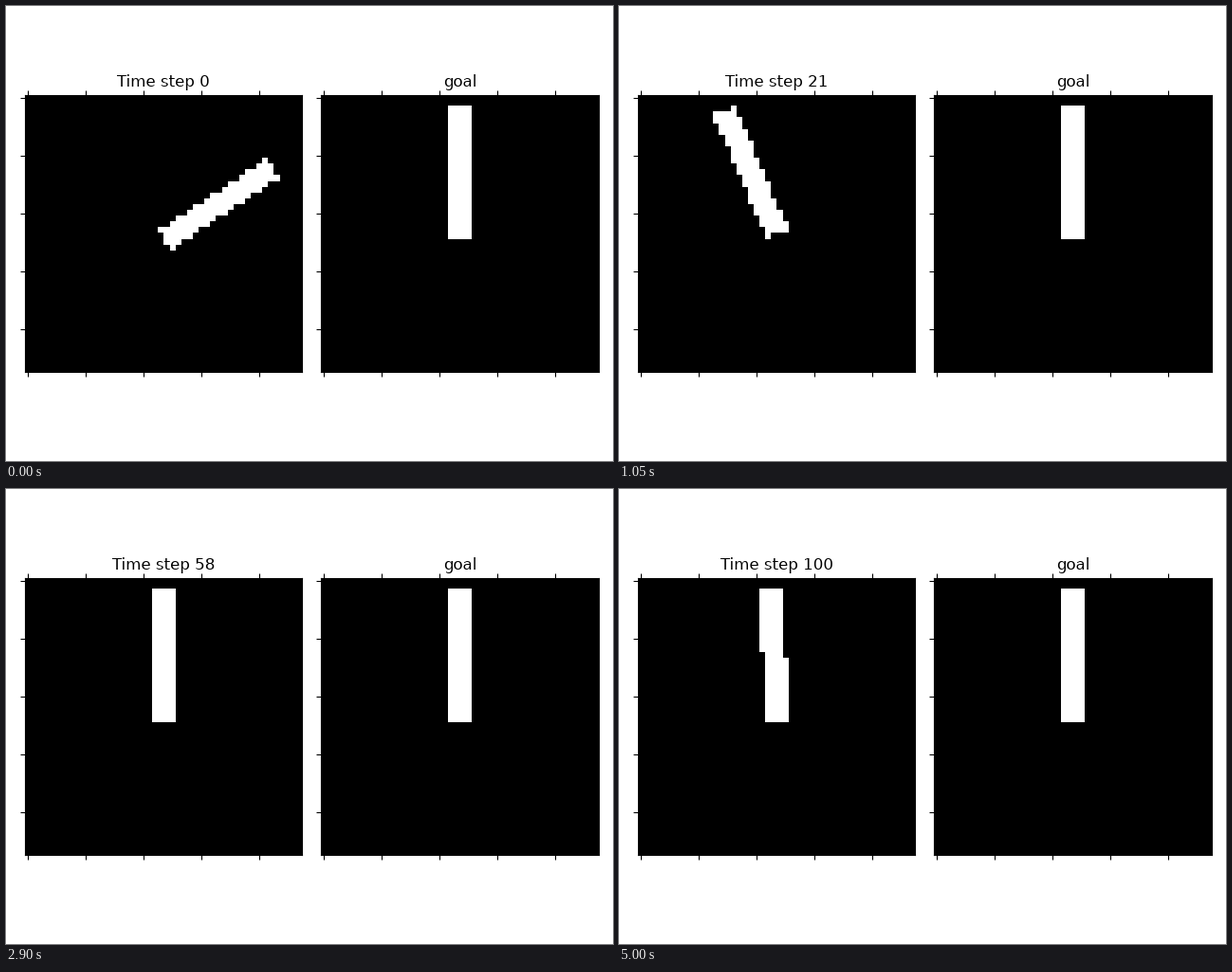
These frames come from a looping animation (640x480 px, 5050 ms). A matplotlib script:

```python
import math
import numpy as np
import matplotlib.pyplot as plt
from matplotlib.animation import FuncAnimation

plt.rcParams["text.hinting"] = "native"

SIZE = 48        # cells per side
PIVOT = 24
LENGTH = 22
STEPS = 101


def angle(step):
    """Lean from upright in radians: swing up, overshoot, then hover."""
    if step <= 13:
        return math.radians(58.5 - 0.1046 * step ** 2.4)
    s = step - 14.1
    decay = math.exp(-0.075 * s)
    swing = -35.5 * math.sin(0.245 * s)
    hover = -0.88 + 1.9 * math.cos(2 * math.pi * (step - 57) / 15.5)
    return math.radians(decay * swing + (1 - decay) * hover)


def half_up(v):
    return int(math.copysign(math.floor(abs(v) + 0.5), v))


def half_down(v):
    return int(math.copysign(math.ceil(abs(v) - 0.5), v))


def pole_corners(theta):
    """Whole-cell corners of a line four cells wide."""
    x0 = y0 = PIVOT
    x1 = math.floor(PIVOT + LENGTH * math.sin(theta))
    y1 = math.floor(PIVOT - LENGTH * math.cos(theta))
    dx, dy = x1 - x0, y1 - y0
    dist = math.hypot(dx, dy)
    left, right = half_down(dy / dist), half_down(2 * dy / dist)
    up, down = half_up(dx / dist), half_up(2 * dx / dist)
    return [(x0 - left, y0 + down), (x1 - left, y1 + down),
            (x1 + right, y1 - up), (x0 + right, y0 - up)]


def draw_pole(theta):
    """Fill the pole row by row on the cell grid."""
    grid = np.zeros((SIZE, SIZE))
    pts = pole_corners(theta)
    edges = list(zip(pts, pts[1:] + pts[:1]))
    rows = [y for _, y in pts]
    for y in range(min(rows), max(rows) + 1):
        xs = []
        for (xa, ya), (xb, yb) in edges:
            if ya == yb == y:
                xs += [xa, xb]
            elif ya != yb and min(ya, yb) <= y <= max(ya, yb):
                xs.append(xa + (y - ya) * (xb - xa) / (yb - ya))
        first = math.floor(min(xs) + 0.5)
        last = math.ceil(max(xs) - 0.5)
        grid[y, first:last + 1] = 1
    return grid


def show_grid(ax, grid, title):
    image = ax.imshow(grid, cmap="gray", vmin=0, vmax=1,
                      interpolation="nearest")
    ticks = np.arange(0, SIZE, 10)
    ax.set_xticks(ticks)
    ax.set_yticks(ticks)
    ax.tick_params(top=True, labelbottom=False, labelleft=False)
    return image, ax.set_title(title, y=1.0)


fig, (ax_now, ax_goal) = plt.subplots(1, 2, figsize=(6.4, 4.8), dpi=100)
pole, label = show_grid(ax_now, draw_pole(angle(0)), "Time step 0")
show_grid(ax_goal, draw_pole(0), "goal")
fig.tight_layout()


def update(step):
    pole.set_data(draw_pole(angle(step)))
    label.set_text(f"Time step {step}")
    return pole, label


anim = FuncAnimation(fig, update, frames=STEPS, interval=50, repeat=True)
plt.show()
```
